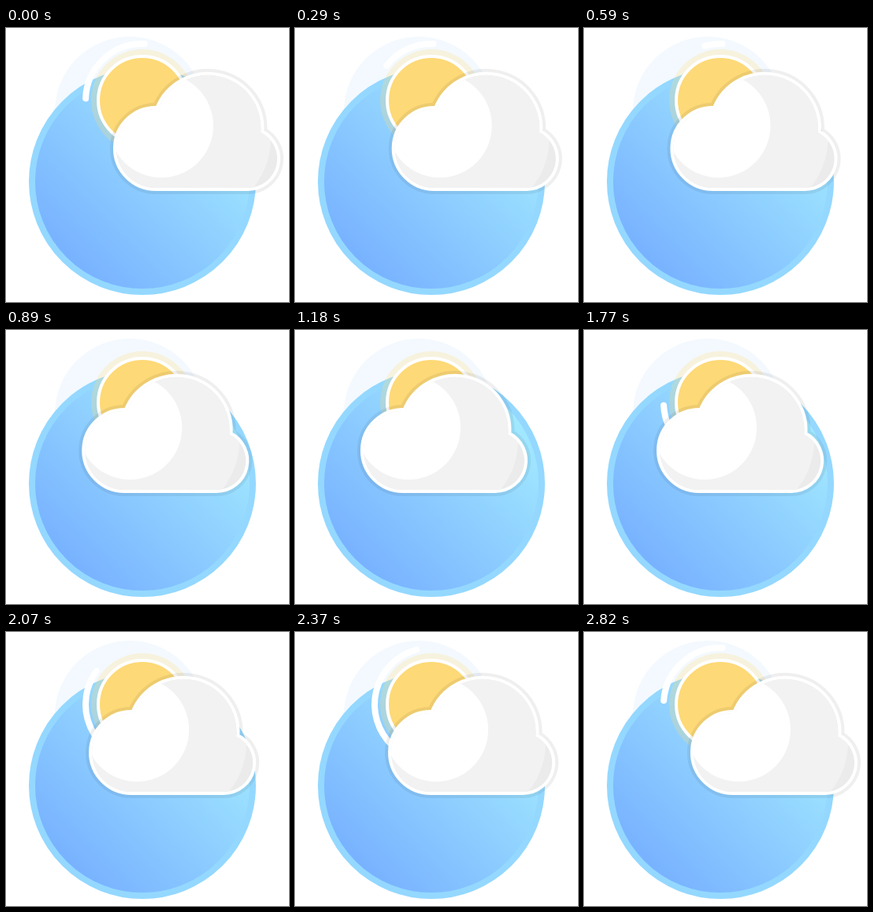
An HTML page for the animation above (2.97 s loop, 359 px wide and 348 px high).

```html
<!DOCTYPE html>
<html lang="en">
<head>
<meta charset="utf-8">
<title>Sun and cloud</title>
<style>
  html, body { margin: 0; height: 100%; overflow: hidden; background: #fff; }
  svg { display: block; width: 359px; height: 348px; }
</style>
</head>
<body>
<svg viewBox="0 0 359 348">
  <defs>
    <linearGradient id="sky" gradientUnits="userSpaceOnUse" x1="77" y1="291" x2="269" y2="99">
      <stop offset="0" stop-color="#78b2ff"/>
      <stop offset="1" stop-color="#a2e9ff"/>
    </linearGradient>
    <path id="outline" stroke-linejoin="round"
      d="M191 203A50 50 0 1 1 192.9 103.1A67.5 67.5 0 0 1 323.2 132.7A37 37 0 0 1 307 203Z"/>
    <clipPath id="inside"><use href="#outline"/></clipPath>
  </defs>

  <circle cx="157" cy="106" r="95" fill="#f3f9fe"/>
  <circle cx="173" cy="195" r="140" fill="url(#sky)" stroke="#94d8ff" stroke-width="8"/>

  <circle cx="173" cy="92" r="65" fill="#fdd977" opacity=".25"/>
  <path id="ray" fill="none" stroke="#fff" stroke-width="8" stroke-linecap="round"/>
  <circle cx="173" cy="92" r="56" fill="#fdd977" stroke="#fff" stroke-width="4"/>

  <g id="cloud">
    <use href="#outline" stroke="#000" stroke-width="16" opacity=".06"/>
    <use href="#outline" fill="#fff" stroke="#fff" stroke-width="8"/>
    <g clip-path="url(#inside)">
      <rect x="130" y="50" width="220" height="160" fill="#ebebeb"/>
      <circle cx="237" cy="140" r="99" fill="#f2f2f2"/>
      <circle cx="197" cy="124" r="66" fill="#fff"/>
    </g>
  </g>
</svg>
<script>
  const LOOP = 2970, STEPS = 20, LAST_ANGLE = 272;
  const cloud = document.getElementById('cloud');
  const ray = document.getElementById('ray');

  // The motion is held in steps of 150 ms, three of them 10 ms shorter.
  const stepStart = k => 150 * k - 10 * ((k > 0) + (k > 7) + (k > 9));

  function point(degrees) {
    const a = degrees * Math.PI / 180;
    return `${173 + 72 * Math.cos(a)} ${92 + 72 * Math.sin(a)}`;
  }

  function draw(now) {
    const t = now % LOOP;
    let k = STEPS - 1;
    while (stepStart(k) > t) k--;

    const back = 18.75 - k;
    const shift = Math.min(6.62 * k, Math.max(1, 6.5 * back));
    cloud.setAttribute('transform', `translate(${-shift})`);

    // The ray is drawn on clockwise around the sun, then wiped off from its tail.
    const leaving = k < 9;
    const head = leaving ? LAST_ANGLE : Math.min(LAST_ANGLE, 177 + 19.5 * (k - 12));
    const tail = leaving ? 182 + 18 * k : Math.min(184, Math.max(90, 182 - 18 * back));
    ray.setAttribute('d', tail < head
      ? `M${point(tail)}A72 72 0 ${+(head - tail > 180)} 1 ${point(head)}` : '');
  }

  const start = performance.now();
  function tick() {
    draw(performance.now() - start);
    requestAnimationFrame(tick);
  }
  tick();
</script>
</body>
</html>
```
